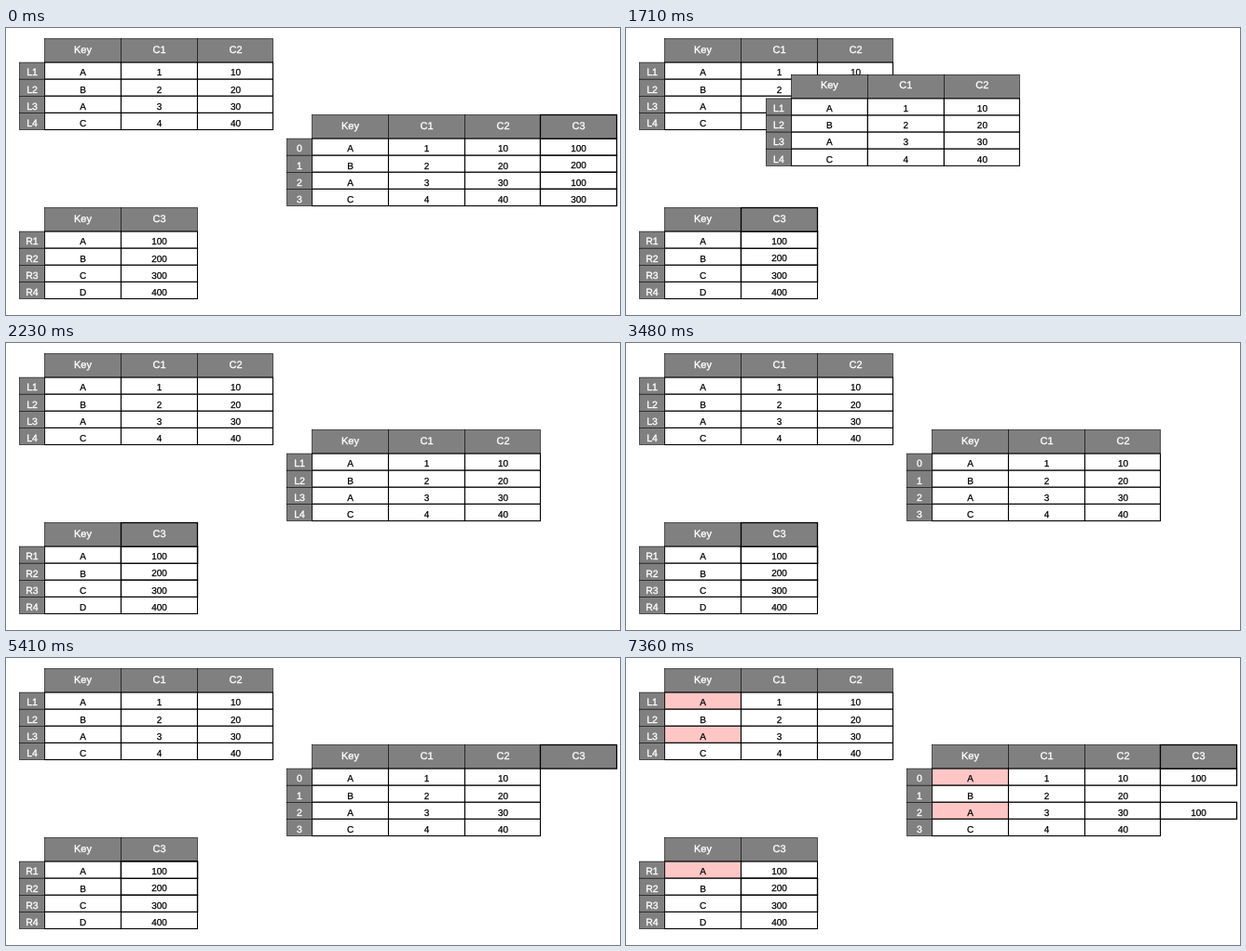
Write an HTML page that moves like this. It is 659 px wide and 309 px high and loops after 8000 ms.

```html
<!DOCTYPE html>
<html lang="en">
<head>
<meta charset="utf-8">
<title>Left join</title>
<style>
  html, body { margin: 0; width: 100%; height: 100%; overflow: hidden; background: #fff; }
  svg { display: block; width: 659px; height: 309px; }
  rect { stroke: #000; stroke-width: 1.1; }
  .grey { fill: #808080; stroke-width: .6; }
  .bold { stroke-width: 1.3; }
  text {
    font-family: "Liberation Sans", Arial, sans-serif; font-size: 10px; text-anchor: middle;
    text-rendering: geometricPrecision; fill: #000; stroke: #000; stroke-width: .25;
  }
  .head { font-size: 11px; fill: #fff; stroke: #fff; stroke-width: .35; }
  .label { font-size: 10.5px; fill: #fff; stroke: #fff; stroke-width: .35; }
</style>
</head>
<body>
<svg id="stage" viewBox="0 0 659 309"></svg>
<script>
const LOOP = 8000, STEP = 58.8;
const WHITE = '#fff', PINK = '#ffc6c6';
const LABEL_W = 27, HEAD_H = 25.6, ROW_H = 18.1, COL_W = 81.8;
const TEXT_DY = 14.3;
const stage = document.getElementById('stage');

function add(parent, tag, attrs = {}, text = '') {
  const el = document.createElementNS('http://www.w3.org/2000/svg', tag);
  for (const name in attrs) el.setAttribute(name, attrs[name]);
  el.textContent = text;
  return parent.appendChild(el);
}

const group = () => add(stage, 'g');
const colX = i => LABEL_W + Math.round(COL_W * i);
const rowY = i => HEAD_H + ROW_H * i;
const move = (el, x, y) => el.setAttribute('transform', `translate(${x + .5} ${y + .5})`);
const show = (el, on) => el.setAttribute('visibility', on ? 'visible' : 'hidden');

function headCell(parent, x, width, text, cls = 'grey') {
  add(parent, 'rect', { x, y: 0, width, height: HEAD_H, class: cls });
  add(parent, 'text', { x: x + 41, y: 15.1, class: 'head' }, text);
}

function bodyCell(parent, x, y, width, text, cls = '') {
  const box = add(parent, 'rect', { x, y, width, height: ROW_H, fill: WHITE, class: cls });
  add(parent, 'text', { x: x + 41, y: y + TEXT_DY }, text);
  return box;
}

const keyCells = [];

function body(parent, heads, rows) {
  const width = c => colX(c + 1) - colX(c);
  heads.forEach((name, c) => headCell(parent, colX(c), width(c), name));
  rows.forEach((row, r) => row.forEach((value, c) => {
    const box = bodyCell(parent, colX(c), rowY(r), width(c), value);
    if (value === 'A') keyCells.push(box);
  }));
}

function labelBoxes(parent) {
  for (let r = 0; r < 4; r++)
    add(parent, 'rect', { x: 0, y: rowY(r), width: LABEL_W, height: ROW_H, class: 'grey' });
}

function labelTexts(parent, names) {
  const g = add(parent, 'g');
  names.forEach((name, r) =>
    add(g, 'text', { x: 13.5, y: rowY(r) + TEXT_DY, class: 'label' }, name));
  return g;
}

const leftHeads = ['Key', 'C1', 'C2'];
const leftRows = [['A', 1, 10], ['B', 2, 20], ['A', 3, 30], ['C', 4, 40]];
const leftNames = ['L1', 'L2', 'L3', 'L4'];
const rightRows = [['A', 100], ['B', 200], ['C', 300], ['D', 400]];

const left = group();
body(left, leftHeads, leftRows);
labelBoxes(left);
labelTexts(left, leftNames);
move(left, 14, 11);

const right = group();
body(right, ['Key', 'C3'], rightRows);
labelBoxes(right);
labelTexts(right, ['R1', 'R2', 'R3', 'R4']);
move(right, 14, 193);

// Spare copies resting on the right table's C3 column
const spares = [1, 2].map(r => {
  const g = group();
  bodyCell(g, 0, 0, 82, rightRows[r][1], 'bold');
  move(g, 123, 193 + rowY(r));
  return g;
});

const copy = group();
body(copy, leftHeads, leftRows);

const joined = [100, 200, 100, 300].map(value => {
  const g = group();
  bodyCell(g, 0, 0, 82, value, 'bold');
  return g;
});

const c3 = group();
headCell(c3, 0, 82, 'C3', 'grey bold');

const index = group();
labelBoxes(index);
const oldNames = labelTexts(index, leftNames);
const newNames = labelTexts(index, [0, 1, 2, 3]);

const clamp = v => Math.max(0, Math.min(1, v));
const lerp = (a, b, p) => a + (b - a) * p;
const steps = (t, start, step = STEP) => Math.floor((t - start) / step);

// One-second glide: 18 poses, already slightly under way at the first
function glide(t, start) {
  const k = steps(t, start);
  return k < 0 ? 0 : clamp(1 - (17 - k) * .0585);
}

function track(k, points) {
  for (let i = 1; i < points.length; i++) {
    const [k0, v0] = points[i - 1], [k1, v1] = points[i];
    if (k <= k1) return lerp(v0, v1, clamp((k - k0) / (k1 - k0)));
  }
  return 1;
}

function draw(t) {
  const done = t < 870;

  const slide = done ? 1 : glide(t, 1230);
  for (const el of [copy, index]) move(el, lerp(14, 301, slide), lerp(11, 93, slide));

  const swap = done ? 1 : clamp((steps(t, 2800, 113.2) + 1) / 7);
  oldNames.setAttribute('opacity', 1 - swap);
  newNames.setAttribute('opacity', swap);

  const k = steps(t, 3930, 59);
  const lift = done ? 1 : k < 0 ? 0 : track(k, [[0, .01], [9, .382], [13, .55], [25, 1]]);
  move(c3, lerp(123, 573, lift), lerp(193, 93, lift));

  const fill = t >= 5950 ? PINK : WHITE;
  keyCells.forEach(box => box.setAttribute('fill', fill));

  const fly = done ? 1 : glide(t, 6360);
  joined.forEach((el, r) => {
    move(el, lerp(123, 573, fly), lerp(193 + rowY(0), 93 + rowY(r), fly));
    show(el, done || r % 2 === 0);
  });
  spares.forEach(el => show(el, !done));
}

function tick() {
  draw(performance.now() % LOOP);
  requestAnimationFrame(tick);
}
tick();
</script>
</body>
</html>
```
